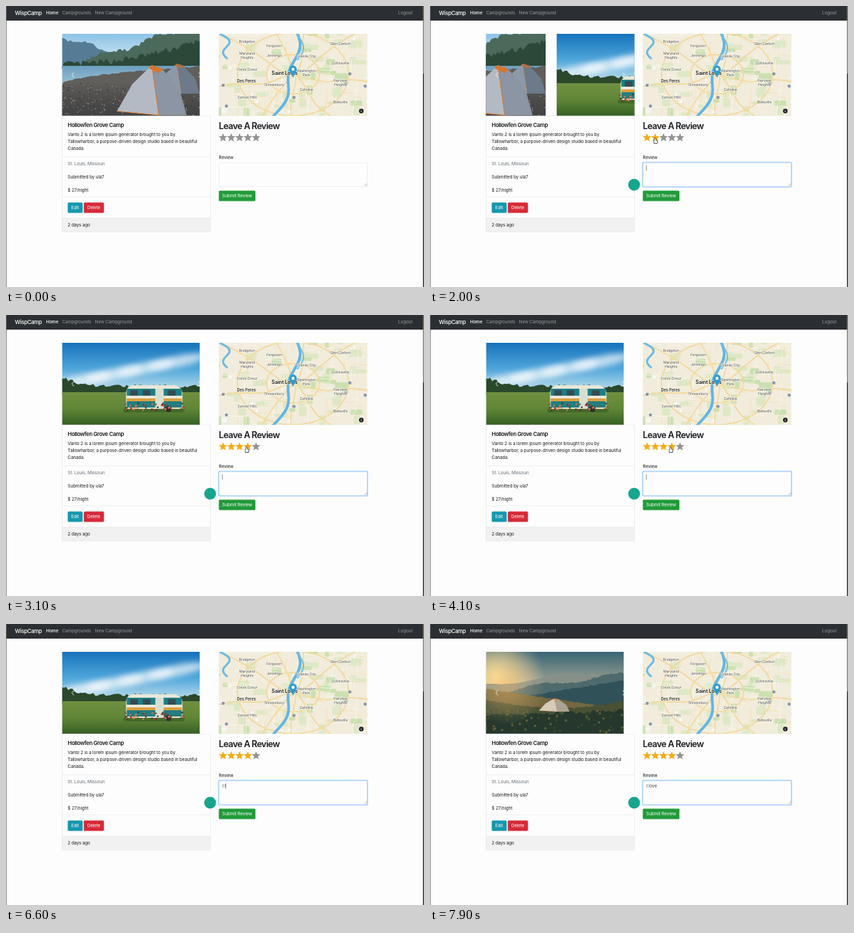
These frames come from a looping animation (600 px wide and 404 px high, 8 s). An HTML page with a canvas:

```html
<!DOCTYPE html>
<html lang="en">
<head>
<meta charset="utf-8">
<title>Campground review</title>
<style>
html, body { margin: 0; width: 100%; height: 100%; overflow: hidden; background: #fdfdfd; }
canvas { display: block; width: 600px; height: 404px; }
</style>
</head>
<body>
<canvas id="stage"></canvas>
<script>
const LOOP = 8000, STEP = 100;
const LEFT = 80.3, RIGHT = 305.5, COL = 213.3, PHOTO_W = 197.7, PHOTO_H = 118;
const canvas = document.getElementById('stage');
const dpr = window.devicePixelRatio || 1;
canvas.width = 600 * dpr;
canvas.height = 404 * dpr;
const ctx = canvas.getContext('2d');

// ---- helpers ----
const ease = u => u * u * (3 - 2 * u);
const progress = (t, start, end) => ease(Math.min(1, Math.max(0, (t - start) / (end - start))));

function random(seed) {
  return () => (seed = (seed * 16807) % 2147483647) / 2147483647;
}

function rect(color, x, y, w, h, r = 0) {
  ctx.fillStyle = color;
  ctx.beginPath();
  ctx.roundRect(x, y, w, h, r);
  ctx.fill();
}

function circle(color, x, y, r) {
  ctx.fillStyle = color;
  ctx.beginPath();
  ctx.arc(x, y, r, 0, Math.PI * 2);
  ctx.fill();
}

function trace(pts) {
  ctx.beginPath();
  for (const [x, y] of pts) ctx.lineTo(x, y);
}

function poly(color, ...pts) {
  trace(pts);
  ctx.fillStyle = color;
  ctx.fill();
}

function line(color, width, ...pts) {
  trace(pts);
  ctx.strokeStyle = color;
  ctx.lineWidth = width;
  ctx.stroke();
}

// Points of a function f(u) for u from 0 to 1
const plot = (f, n = 30) => Array.from({ length: n + 1 }, (_, i) => f(i / n));

function gradient(y0, y1, ...stops) {
  const g = ctx.createLinearGradient(0, y0, 0, y1);
  stops.forEach((c, i) => g.addColorStop(i / (stops.length - 1), c));
  return g;
}

function glow(color, x, y, r) {
  const g = ctx.createRadialGradient(x, y, 0, x, y, r);
  g.addColorStop(0, color);
  g.addColorStop(1, 'rgba(255,220,160,0)');
  rect(g, x - r, y - r, 2 * r, 2 * r);
}

function clip(x, y, w, h, paint) {
  ctx.save();
  ctx.beginPath();
  ctx.rect(x, y, w, h);
  ctx.clip();
  paint();
  ctx.restore();
}

// y is the middle of the lowercase letters
function text(str, x, y, { size = 6.33, weight = 400, color = '#181b1e', track = -0.013, align = 'left', halo } = {}) {
  ctx.font = `${weight} ${size}px Inter, "Open Sans", sans-serif`;
  ctx.letterSpacing = `${track * size}px`;
  ctx.textAlign = align;
  const base = y + size * 0.34;
  if (halo) {
    ctx.strokeStyle = halo;
    ctx.lineWidth = 1.3;
    ctx.lineJoin = 'round';
    ctx.strokeText(str, x, base);
    ctx.lineJoin = 'miter';
  }
  ctx.fillStyle = color;
  ctx.fillText(str, x, base);
}

// ---- carousel pictures ----
function ridge(color, bottom, height, rough, seed) {
  const rnd = random(seed);
  const top = plot(u => [u * PHOTO_W, height(u) - rnd() * rough], 66);
  poly(color, [0, bottom], ...top, [PHOTO_W, bottom]);
}

function specks(colors, count, x, y, w, h, r, seed) {
  const rnd = random(seed);
  for (let i = 0; i < count; i++) circle(colors[i % colors.length], x + rnd() * w, y + rnd() * h, r);
}

function tent(x, y, w, h, light, shade, trim) {
  const peak = [x + w * 0.5, y], base = y + h;
  poly(shade, peak, [x + w * 0.64, y + h * 0.06], [x + w * 0.9, y + h * 0.5], [x + w, base], [x + w * 0.55, base]);
  poly(light, [x, base - h * 0.08], [x + w * 0.22, y + h * 0.38], peak, [x + w * 0.6, base]);
  poly(trim, [x + w * 0.45, y + h * 0.06], peak, [x + w * 0.66, y + h * 0.08], [x + w * 0.6, y + h * 0.16]);
  line(trim, h / 70, [x, base - h * 0.08], [x + w * 0.6, base], peak);
}

function lakePhoto() {
  rect(gradient(0, 50, '#8cc3e8', '#e4eff2'), 0, 0, 198, 118);
  ridge('#557c94', 50, u => 6 + 58 * u + 3 * Math.sin(u * 25), 4, 11);
  ridge('#4c6a5c', 50, u => 51 - 62 * u + 4 * Math.sin(u * 16), 5, 12);
  ridge('#2c4838', 50, u => 48 - 34 * u * u, 9, 13);
  rect(gradient(46, 82, '#6b9fbf', '#a9cbd9'), 0, 46, 198, 40);
  ridge('#605f5b', 118, u => 74 - 26 * Math.sqrt(u), 2, 14);
  rect(gradient(70, 118, 'rgba(50,50,50,0)', '#444345'), 0, 70, 198, 48);
  specks(['#8d8984', '#3c3c3d', '#6d6b69'], 260, 0, 70, 198, 48, 0.9, 15);
  tent(132, 43, 66, 43, '#8d99a8', '#6c7a8a', '#b8703c');
  tent(79, 45, 100, 72, '#b4bac4', '#8b95a3', '#d8762d');
}

function trailerPhoto() {
  rect(gradient(0, 75, '#1773bb', '#4fa6da', '#d3e8ef'), 0, 0, 198, 118);
  ctx.save();
  ctx.filter = 'blur(4px)';
  for (let i = 0; i < 4; i++) {
    ctx.fillStyle = 'rgba(245,250,252,.7)';
    ctx.beginPath();
    ctx.ellipse(30 + i * 45, 54 - i * 9, 42, 8, -0.2, 0, Math.PI * 2);
    ctx.fill();
  }
  ctx.restore();
  ridge('#2b482b', 76, u => 65 - 14 * Math.exp(-u * 9), 5, 9);
  rect(gradient(72, 118, '#6f8f40', '#5f8636', '#365f25'), 0, 71, 198, 47);
  rect('rgba(30,60,20,.35)', 88, 94, 88, 6, 3);
  rect('#e8e7d8', 92, 61, 81, 34, [10, 12, 5, 4]);
  rect('#1c7e86', 93, 66, 79, 10);
  rect('#dd9f3d', 93, 80, 79, 4);
  rect('#237e80', 93, 84, 79, 9);
  for (let i = 0; i < 4; i++) rect('#344c51', 98 + i * 18, 68, 11, 8, 1);
  rect('#d8dfd2', 134, 66, 12, 29, 1);
  circle('#30302d', 153, 95, 4.5);
  specks(['#a33c35', '#d37a50', '#493d2e'], 44, 91, 87, 84, 10, 1.3, 77);
}

function sunsetPhoto() {
  rect(gradient(0, 70, '#386574', '#86938b', '#e0b986'), 0, 0, 198, 118);
  glow('rgba(255,224,150,.95)', 14, 36, 70);
  ridge('#879086', 90, u => 46 - 16 * u + 3 * Math.sin(u * 9), 1, 3);
  ridge('#4d6a6d', 90, u => 60 - 27 * u + 3 * Math.sin(u * 12), 2, 4);
  ridge('#315158', 95, u => 74 - 32 * u, 2, 5);
  ridge('#75673f', 118, u => 54 + 30 * u, 2, 6);
  ridge('#495135', 118, u => 70 + 12 * Math.sin(u * 3), 2, 7);
  ridge('#26382c', 118, u => 92 - 6 * u * u, 5, 8);
  specks(['#38482d', '#635f36'], 70, 0, 83, 198, 33, 1.7, 19);
  glow('rgba(255,190,100,.45)', 30, 50, 55);
  tent(76, 67, 44, 19, '#d8cbb7', '#aaa292', '#cf8a50');
}

const photos = [lakePhoto, trailerPhoto, sunsetPhoto];

function carousel(t) {
  const pos = progress(t, 1690, 2290) + progress(t, 6690, 7290);
  clip(LEFT, 40, COL, PHOTO_H, () => photos.forEach((paint, i) => {
    if (Math.abs(i - pos) >= 1) return;
    ctx.save();
    ctx.translate(LEFT + (i - pos) * COL, 40);
    clip(0, 0, PHOTO_W, PHOTO_H, paint);
    ctx.restore();
  }));
  for (const [x, d] of [[96, 1.5], [278, -1.5]]) {
    line('rgba(255,255,255,.5)', 1.2, [x + d, 95.5], [x - d, 99], [x + d, 102.5]);
  }
}

// ---- map ----
// Columns of places: x, first y, line distance, names
const places = [
  [346, 51, 20, 'Bridgeton', 'Maryland|Heights', 'Creve Coeur', '', 'Sunset Hills'],
  [385, 57, 14, 'Ferguson', 'Jennings', '', '', 'Shrewsbury'],
  [431, 72, 24, 'Granite City', 'Washington|Park', 'Cahokia'],
  [480, 54, 28, 'Glen Carbon', 'Collinsville', 'Fairview|Heights', 'Belleville']
];

function roads() {
  const hub = [412, 98], spokes = 9;
  const routes = Array.from({ length: spokes }, (_, i) => {
    const a = (i + 0.2) * 2 * Math.PI / spokes;
    return plot(u => [
      hub[0] + 130 * u * Math.cos(a) + 5 * Math.sin(u * 7 + i),
      hub[1] + 130 * u * Math.sin(a) + 5 * Math.sin(u * 6)
    ]);
  });
  for (const r of [38, 80]) {
    routes.push(plot(u => [hub[0] + r * Math.cos(u * 6.283), hub[1] + r * 0.75 * Math.sin(u * 6.283)]));
  }
  routes.forEach(r => line('#edc77d', 1.5, ...r));
  routes.forEach(r => line('#f9e6af', 0.9, ...r));
}

function rivers() {
  const main = u => [418 + 5 * Math.sin(u * 10) - 32 * u * u, 39 + 120 * u];
  const loop = u => [318 + 14 * u * Math.cos(u * 3) - 9 * Math.sin(u * 6), 76 - 36 * u];
  const branch = u => [418 + 9 * Math.sin(u * 3.14), 42 + 36 * u];
  line('#62b5e4', 4, ...plot(main));
  line('#6cbae4', 3, ...plot(loop));
  line('#74bee5', 2, ...plot(branch));
}

function map() {
  rect('#f1ecdb', RIGHT, 40, COL, PHOTO_H);
  const rnd = random(314);
  const spot = () => [RIGHT + rnd() * COL, 40 + rnd() * PHOTO_H];
  for (let i = 0; i < 46; i++) {
    const [x, y] = spot();
    rect(i % 3 ? '#dfe8c6' : '#cbe0b0', x - 8, y - 5, 6 + rnd() * 14, 4 + rnd() * 11, 2);
  }
  for (let i = 0; i < 110; i++) {
    const [x, y] = spot(), a = rnd() < 0.5 ? 0.1 : 1.65, l = 8 + rnd() * 24;
    line(i % 3 ? '#fbf8ee' : '#f2dfaf', 0.7, [x, y], [x + l * Math.cos(a), y + l * Math.sin(a)]);
  }
  roads();
  rivers();
  for (let i = 0; i < 13; i++) rect(i % 2 ? '#7f93b2' : '#f9f9f5', ...spot(), 4, 4, 1);

  const label = { size: 5.1, color: '#50534f', align: 'center', track: -0.01, halo: 'rgba(250,248,240,.85)' };
  for (const [x, y, gap, ...names] of places) {
    names.forEach((name, i) => name.split('|').forEach((part, j) => text(part, x, y + i * gap + j * 6.3 - (name.includes('|') ? 3 : 0), label)));
  }
  text('Des Peres', 345, 108, { ...label, size: 5.7, weight: 600, color: '#30322d' });
  text('Saint Louis', 400, 97, { ...label, size: 7.2, weight: 600, color: '#1a1c19' });

  poly('#2f9bc9', [407.5, 94], [416.5, 94], [412, 103]);
  circle('#309dcc', 412, 91, 5.4);
  circle('#fff', 412, 91, 2.2);
  circle('#f5f6f3', 313, 151.3, 4);
  circle('#fff', 510, 151, 4.5);
  circle('#222', 510, 151, 3.4);
  text('i', 510, 151, { size: 5, weight: 700, color: '#fff', align: 'center' });
}

// ---- page ----
function navbar() {
  rect('#2b2f33', 0, 0, 600, 21);
  const muted = { color: '#999c9e' };
  text('WispCamp', 12.7, 10, { size: 7.9, weight: 500, color: '#fff', track: -0.04 });
  text('Home', 57.5, 10, { color: '#fff', weight: 500 });
  text('Campgrounds', 80.8, 10, muted);
  text('New Campground', 127.8, 10, muted);
  text('Logout', 563, 10, muted);
}

function button(label, color, x, y, w) {
  rect(color, x, y, w, 15.1, 1.6);
  text(label, x + w / 2, y + 7.5, { color: '#fff', align: 'center' });
}

function card() {
  const x = 88.6, border = '#e3e3e3';
  rect('#f1f1f1', LEFT, 305, COL, 20);
  ctx.strokeStyle = border;
  ctx.lineWidth = 0.6;
  ctx.strokeRect(LEFT, 158, COL, 167);
  for (const y of [217, 274.3, 305]) line(border, 0.6, [LEFT, y], [LEFT + COL, y]);
  text('Hollowfen Grove Camp', x, 171.5, { size: 7.9, weight: 600, track: -0.045 });
  [
    'Vanto 2 is a lorem ipsum generator brought to you by',
    'Tallowharbor, a purpose-driven design studio based in beautiful',
    'Canada.'
  ].forEach((str, i) => text(str, x, 185.3 + i * 9.55));
  text('St. Louis, Missouri', x, 227, { color: '#656d74' });
  text('Submitted by ula7', x, 245.7);
  text('$ 27/night', x, 264.7);
  button('Edit', '#1698ae', x, 282.5, 21.4);
  button('Delete', '#d52a38', 111.6, 282.5, 29);
  text('2 days ago', x, 315.3);
}

function star(x, y, color) {
  poly(color, ...plot(u => {
    const i = Math.round(u * 10), a = i * Math.PI / 5 - Math.PI / 2, r = i % 2 ? 2.9 : 6.4;
    return [x + r * Math.cos(a), y + r * Math.sin(a)];
  }, 10));
}

function typing(t) {
  const start = 6200, gap = 190, phrase = 'I love';
  const count = Math.min(phrase.length, Math.max(0, Math.floor((t - start) / gap) + 1));
  const lastKey = start + (count - 1) * gap;
  const caret = count ? t - lastKey < 500 : (t + 280) % 1000 < 500;
  return { str: phrase.slice(0, count), caret };
}

function form(t, stars) {
  text('Leave A Review', RIGHT, 172.5, { size: 12.66, weight: 600, track: -0.05 });
  for (let i = 0; i < 5; i++) star(311.5 + i * 11.86, 189.3, i < stars ? '#f3ad1b' : '#939393');
  text('Review', RIGHT, 217.4);

  const focused = t >= 400;
  if (focused) rect('#bfddff', RIGHT - 1.2, 223.8, COL + 2.4, 37.4, 2.4);
  rect(focused ? '#80b9f6' : '#dcdfe2', RIGHT, 225, COL, 35, 1.6);
  rect('#fdfdfd', RIGHT + 0.5, 225.5, COL - 1, 34, 1.3);
  for (const d of [1.8, 3.5]) line('#8a8a8a', 0.5, [518 - d, 258.5], [518, 258.5 - d]);
  button('Submit Review', '#229a3a', RIGHT, 265.5, 52.5);
  if (!focused) return;

  const { str, caret } = typing(t);
  text(str, 310.5, 233, { color: '#3d444b' });
  if (caret) rect('#555', 310.4 + ctx.measureText(str).width, 229.2, 0.6, 7.6);
  if (t >= 600) circle('#17a58d', 293, 257, 8.5);
}

// ---- pointer ----
// Moves: start, end, target x, target y
const moves = [[1200, 2000, 323.5, 192.5], [2500, 2900, 345.5, 192.5], [4300, 4900, 355.5, 241]];

function pointerAt(t) {
  let x = 341, y = 237;
  for (const [start, end, tx, ty] of moves) {
    const u = progress(t, start, end);
    x += (tx - x) * u;
    y += (ty - y) * u;
  }
  return { x, y, visible: t >= 400 && t < 6100 };
}

function starsAt(t, { x, y }) {
  if (t >= 2900) return 4;
  return y < 196 ? Math.floor((x - RIGHT) / 11.86) + 1 : 0;
}

function drawPointer({ x, y }) {
  if (y < 205) {
    for (const [color, pad] of [['#222', 0.6], ['#fff', 0]]) {
      rect(color, x - 1 - pad, y - 2.5 - pad, 1.4 + 2 * pad, 5 + 2 * pad, 0.7);
      rect(color, x - 2 - pad, y + 0.8 - pad, 4.8 + 2 * pad, 4 + 2 * pad, 1.4);
    }
    return;
  }
  line('#222', 0.8, [x, y - 3], [x, y + 3]);
  for (const d of [-1, 1]) line('#222', 0.7, [x - 1.6, y + 3.6 * d], [x, y + 3 * d], [x + 1.6, y + 3.6 * d]);
}

function draw(t) {
  ctx.setTransform(dpr, 0, 0, dpr, 0, 0);
  rect('#fdfdfd', 0, 0, 600, 404);
  navbar();
  carousel(t);
  card();
  clip(RIGHT, 40, COL, PHOTO_H, map);
  const pointer = pointerAt(t);
  form(t, starsAt(t, pointer));
  if (pointer.visible) drawPointer(pointer);
  rect('#6a6a6c', 0, 0, 0.8, 404);
  rect('#8d8050', 598.6, 0, 1.4, 97);
  rect('#33223f', 598.6, 97, 1.4, 307);
}

let last = -1;
function tick() {
  const t = Math.floor((performance.now() % LOOP) / STEP) * STEP;
  if (t !== last) draw(last = t);
  requestAnimationFrame(tick);
}
tick();
</script>
</body>
</html>
```
